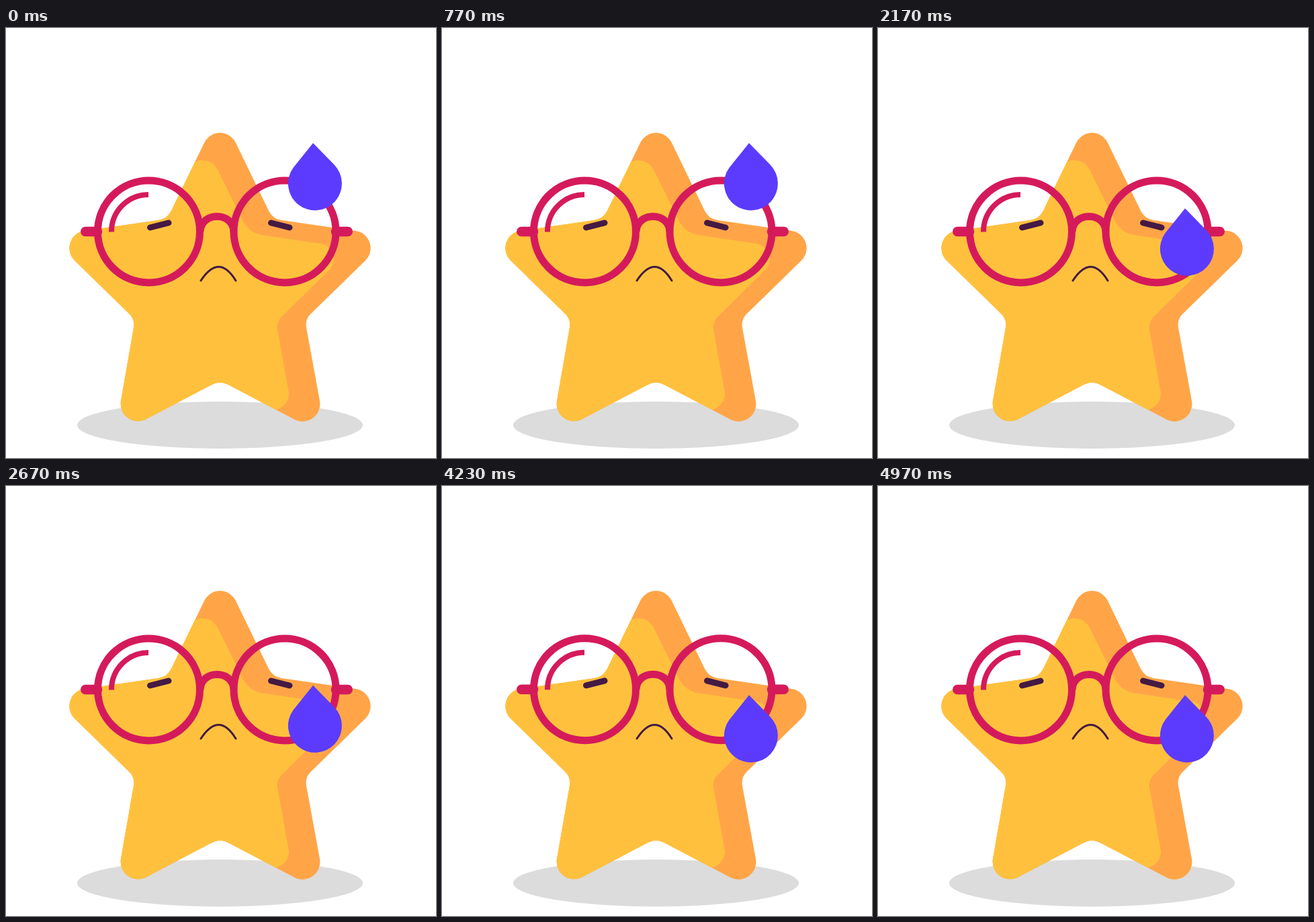
An HTML page that plays this animation: 640 by 640 pixels, repeating every 8.41 s.

```html
<!DOCTYPE html>
<html lang="en">
<head>
<meta charset="utf-8">
<title>Tired star</title>
<style>
  html, body { margin: 0; width: 100%; height: 100%; overflow: hidden; background: #fff; }
  svg { display: block; width: 100%; height: 100%; }
</style>
</head>
<body>
<svg viewBox="0 0 640 640">
  <defs>
    <path id="star" d="M295 171 A26 26 0 0 1 342 171 L391 272 Q397 284 410 286
      L521 302 A26 26 0 0 1 535 346 L454 425 Q445 433 447 446
      L467 555 A26 26 0 0 1 430 583 L331 531 Q318.5 524 306 531
      L207 583 A26 26 0 0 1 171 555 L190 446 Q192 433 183 425
      L102 346 A26 26 0 0 1 116 302 L227 286 Q240 284 246 272 Z"/>
    <clipPath id="inside"><use href="#star"/></clipPath>
  </defs>

  <ellipse cx="318.5" cy="591" rx="212.5" ry="35" fill="#dcdcdc"/>
  <use href="#star" fill="#ffa548"/>
  <path clip-path="url(#inside)" fill="#ffc13d" d="M282 199 A26 26 0 0 1 315 211
    L352 286 Q361 304 380 308 L468 321 A23 23 0 0 1 479 362
    L412 428 Q402 437 404 449 L421 543 A25 25 0 0 1 402 568
    L360 640 H60 V250 Z"/>

  <g fill="none" stroke="#451a43" stroke-linecap="round">
    <path d="M290 376 Q317 335 342 376" stroke-width="3"/>
    <path id="eyes" d="M214.5 297 L242 290 M394.5 290 L422 297" stroke-width="9"/>
  </g>

  <g id="glasses" fill="none" stroke="#d51a5b" stroke-width="11">
    <path d="M118.3 303 H136 M508.7 303 H491" stroke-width="14.5" stroke-linecap="round"/>
    <circle cx="212.5" cy="303" r="76"/>
    <circle cx="415" cy="303" r="76"/>
    <path d="M289 303 C290 273 338 273 339 303"/>
    <path d="M157 303.5 A55 55 0 0 1 212 248" stroke-width="8"/>
  </g>

  <path id="drop" fill="#5c3bfe" d="M457 171.3 L488.5 203.5 A40 40 0 1 1 427.5 208 Z"/>
</svg>
<script>
const LOOP = 8410;
const NUDGES = [0, 4200];
const [eyes, glasses, drop] = ["eyes", "glasses", "drop"].map(id => document.getElementById(id));

// Cubic easing with flat ends; a and b are the x positions of its handles.
function ease(x, a = 1 / 3, b = 2 / 3) {
  if (x <= 0) return 0;
  if (x >= 1) return 1;
  let low = 0, high = 1, t;
  for (let i = 0; i < 20; i++) {
    t = (low + high) / 2;
    const at = 3 * a * t * (1 - t) ** 2 + 3 * b * t * t * (1 - t) + t ** 3;
    if (at < x) low = t; else high = t;
  }
  return t * t * (3 - 2 * t);
}

const span = (time, from, to) => (time - from) / (to - from);

const nudge = time => ease(span(time, 0, 367)) - ease(span(time, 367, 775), 0.33, 0.3);

function fall(time) {
  return 68.7 * ease(span(time, 900, 1767), 0.33, 0.71)
       + 56.5 * ease(span(time, 1767, 2633), 0.33, 0.57)
       + 14.8 * ease(span(time, 2633, 3210));
}

function shift(part, y) {
  part.setAttribute("transform", `translate(0 ${y.toFixed(2)})`);
}

function render(time) {
  const lift = NUDGES.reduce((sum, start) => sum + nudge(time - start), 0);
  shift(glasses, -12.6 * lift);
  shift(eyes, -7.3 * lift);
  shift(drop, fall(time));
}

const begin = performance.now();
function tick() {
  render((performance.now() - begin) % LOOP);
  requestAnimationFrame(tick);
}
tick();
</script>
</body>
</html>
```
